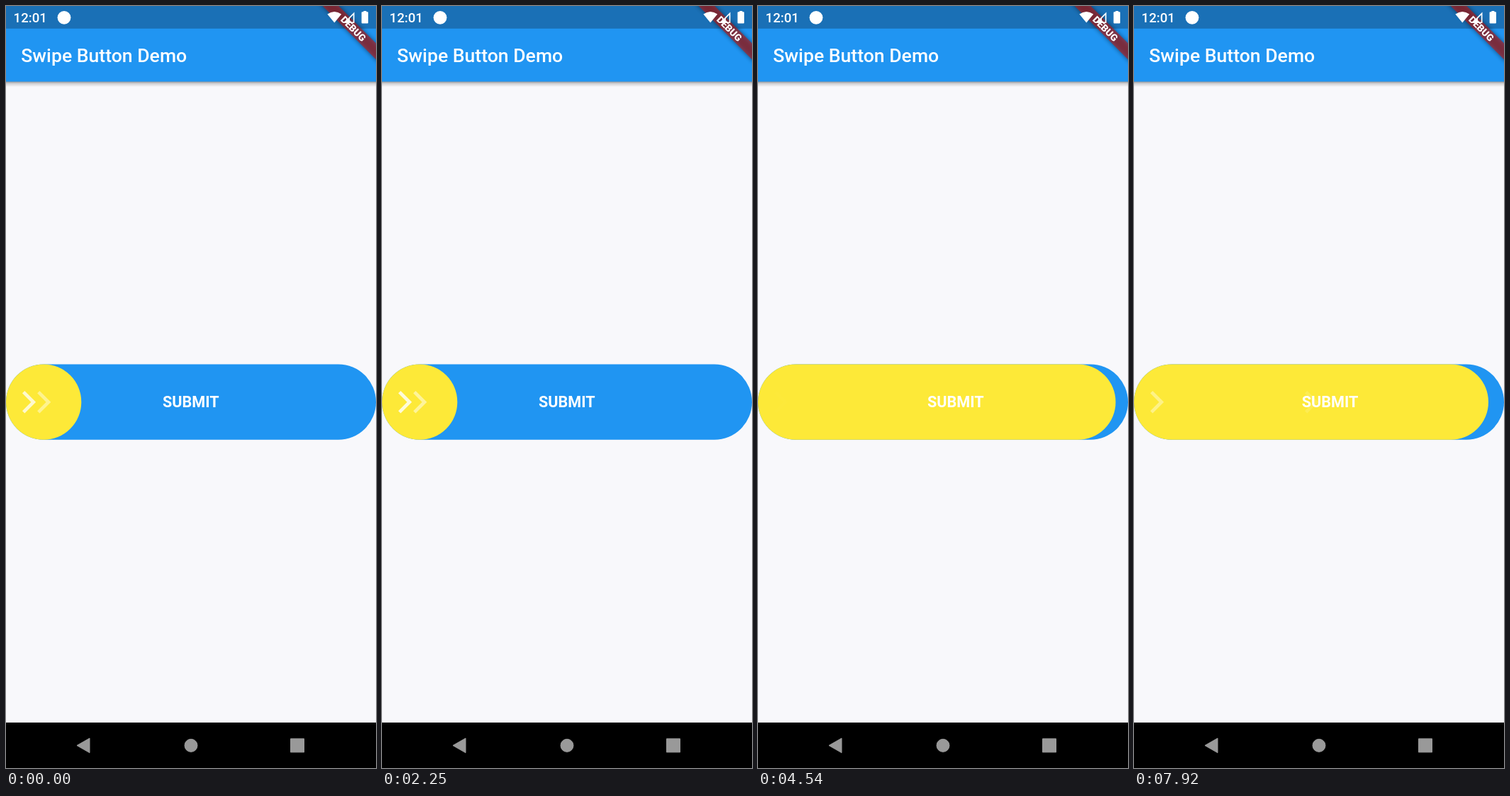
An HTML page for the animation above (8 s loop, 522x1073 px).

```html
<!DOCTYPE html>
<html lang="en">
<head>
<meta charset="utf-8">
<title>Swipe Button Demo</title>
<style>
  html, body { margin: 0; width: 100%; height: 100%; overflow: hidden; background: #f8f8fb; }
  svg { display: block; width: 100%; height: 100%; }
  text { font-family: Roboto, "Liberation Sans", sans-serif; fill: #fff; }
  .title { font-size: 26.6px; font-weight: 500; }
  .clock { font-size: 18.6px; font-weight: 500; }
  .label { font-size: 21.6px; font-weight: 700; text-anchor: middle; }
  .debug { font-size: 13.6px; font-weight: 900; text-anchor: middle; }
</style>
</head>
<body>
<svg viewBox="0 0 522 1073">
  <defs>
    <linearGradient id="shade" x2="0" y2="1">
      <stop offset="0" stop-color="#000" stop-opacity=".42"/>
      <stop offset=".4" stop-color="#000" stop-opacity=".16"/>
      <stop offset="1" stop-color="#000" stop-opacity="0"/>
    </linearGradient>
    <filter id="blur" x="-20%" y="-60%" width="140%" height="220%">
      <feGaussianBlur stdDeviation="3"/>
    </filter>
    <clipPath id="thumbClip"><rect id="clipBox" y="504.5" height="106.3" rx="53.15"/></clipPath>
    <path id="chevron" fill="#fff"
      d="M5.88 4.12L13.76 12l-7.88 7.88L8 22l10-10L8 2z"/>
  </defs>

  <rect width="522" height="1073" fill="#f8f8fb"/>

  <!-- app bar -->
  <rect y="106" width="522" height="8" fill="url(#shade)"/>
  <rect width="522" height="106.5" fill="#2095f2"/>
  <rect width="522" height="31.8" fill="#1a70b6"/>
  <text class="title" x="21.3" y="79.3">Swipe Button Demo</text>

  <!-- corner banner -->
  <g transform="translate(522 0) rotate(45)">
    <rect x="-60" y="37.2" width="120" height="16" fill="#000" opacity=".5" filter="url(#blur)"/>
    <rect x="-60" y="37.2" width="120" height="16" fill="#b71c1c" fill-opacity=".63"/>
    <text class="debug" y="50">DEBUG</text>
  </g>

  <!-- status bar -->
  <text class="clock" x="10.6" y="22.8">12:01</text>
  <g fill="#fff">
    <circle cx="82" cy="16.3" r="9.4"/>
    <path d="M463.3 23.6L453.4 11.4Q463.3 4.4 473.2 11.4Z"/>
    <path fill-rule="evenodd" d="M491.5 8.5V24H476ZM489.8 12.6L485 17.4V22.4H489.8Z"/>
    <path d="M504.4 8.3V7h4v1.3H510a1 1 0 0 1 1 1V23.5a1 1 0 0 1-1 1H502.600a1 1 0 0 1-1-1V9.300a1 1 0 0 1 1-1Z"/>
  </g>

  <!-- swipe button -->
  <rect y="504.5" width="522" height="106.3" rx="53.15" fill="#2095f2"/>
  <text class="label" x="260.8" y="565.2">SUBMIT</text>
  <rect id="thumb" y="504.5" height="106.3" rx="53.15" fill="#fde938"/>
  <g clip-path="url(#thumbClip)">
    <use id="chevA" href="#chevron"/>
    <use id="chevB" href="#chevron"/>
    <text id="label" class="label" y="565.2">SUBMIT</text>
  </g>

  <!-- navigation bar -->
  <rect y="1009" width="522" height="64"/>
  <g fill="#999" stroke="#999" stroke-linejoin="round">
    <path d="M100 1041.300L118 1031V1051.600Z"/>
    <circle cx="261" cy="1041.300" r="9"/>
    <rect x="401.500" y="1031.800" width="19" height="19"/>
  </g>
</svg>
<script>
  const LOOP = 8000, PULSE = 600, REST = 106.3, FULL = 522;
  const $ = id => document.getElementById(id);
  const thumb = $("thumb"), clipBox = $("clipBox"), label = $("label");
  const chevA = $("chevA"), chevB = $("chevB");

  // [time, value] pairs
  const drag = [
    [2700, REST], [3100, 155], [3750, 370], [4150, 456],
    [4540, 504.5], [4800, FULL], [7600, FULL], [7920, 500]
  ];
  const pulse = [[340, 0], [470, 0.95], [600, 0.75], [720, 0.4], [850, 0]];

  function sample(keys, t) {
    if (t <= keys[0][0]) return keys[0][1];
    for (let i = 1; i < keys.length; i++) {
      const [t0, v0] = keys[i - 1], [t1, v1] = keys[i];
      if (t <= t1) return v0 + (v1 - v0) * (t - t0) / (t1 - t0);
    }
    return keys[keys.length - 1][1];
  }

  function placeChevron(el, left, opacity) {
    el.setAttribute("transform", `translate(${left - 9.3} 538.8) scale(1.58)`);
    el.setAttribute("opacity", opacity);
  }

  function draw(t) {
    const width = sample(drag, t);
    thumb.setAttribute("width", width);
    clipBox.setAttribute("width", width);

    let phase = t % PULSE;
    if (phase < 340) phase += PULSE;
    const glow = sample(pulse, phase);
    placeChevron(chevA, 23, glow);
    placeChevron(chevB, width / 2 - 9, Math.max(0, glow * 0.85 - 0.2));

    label.setAttribute("x", width / 2 + 26.5);
    label.setAttribute("visibility", width > FULL / 2 ? "visible" : "hidden");
  }

  const start = performance.now();
  function tick() {
    draw((performance.now() - start) % LOOP);
    requestAnimationFrame(tick);
  }
  tick();
</script>
</body>
</html>
```
